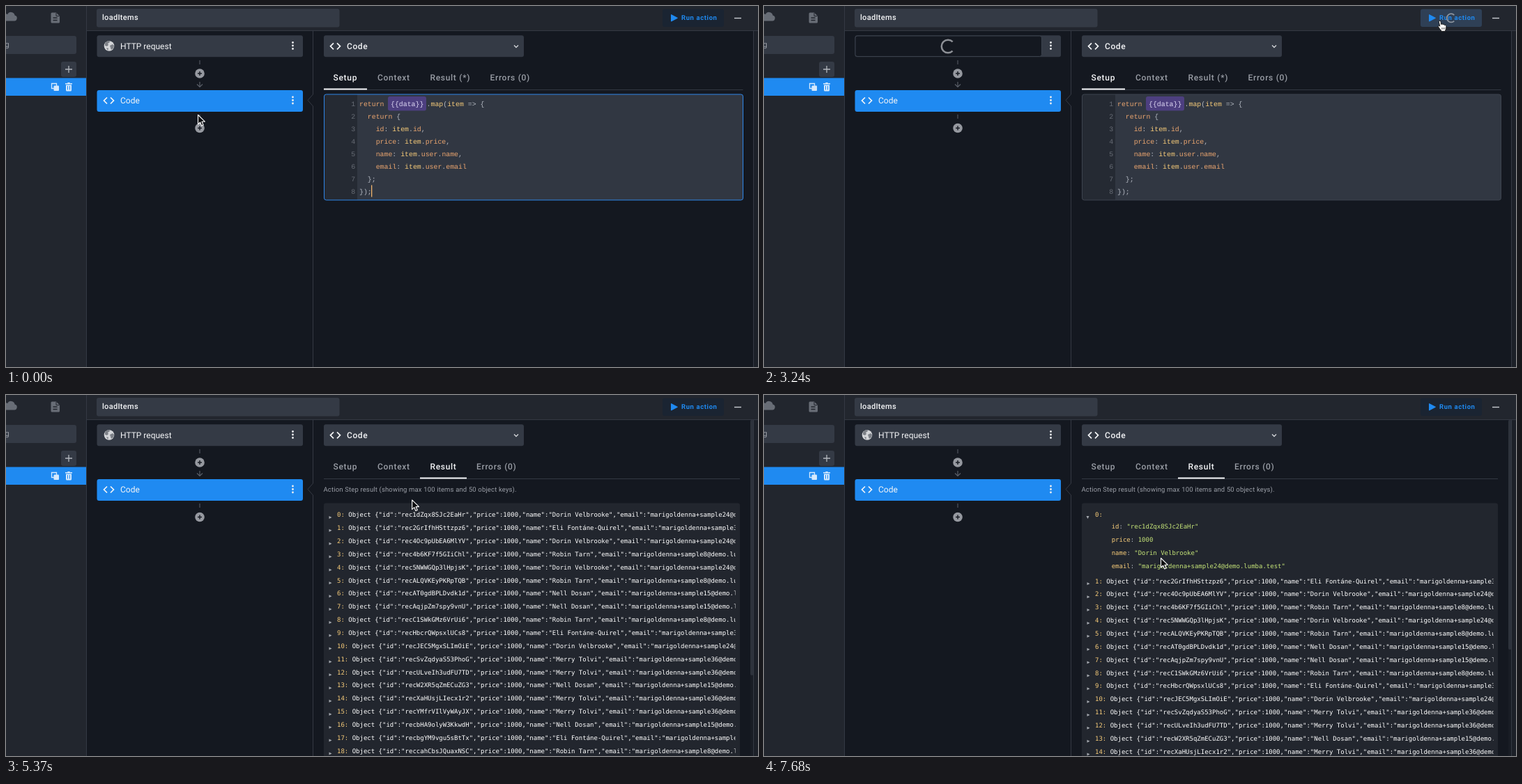
These frames come from a looping animation (1079x519 px, 7710 ms). An HTML page:

```html
<!DOCTYPE html>
<html lang="en">
<head>
<meta charset="utf-8">
<title>Action editor</title>
<style>
html, body { margin: 0; width: 100%; height: 100%; overflow: hidden; background: #141820; }
svg { display: block; width: 1079px; height: 519px; }
text { font-family: Roboto, sans-serif; white-space: pre; text-rendering: geometricPrecision; }
.code text { font: 9.87px "Liberation Mono", monospace; }
.tree text { font: 9px "DejaVu Sans Mono", monospace; }
</style>
</head>
<body>
<svg id="stage" viewBox="0 0 1079 519"></svg>
<script>
const LOOP = 7710;
const C = {
  bg: '#141820', bar: '#22262e', field: '#343a45', line: '#343943', blue: '#1f8af1',
  white: '#f4f5f7', grey: '#9a9ea6', dim: '#686d76', yellow: '#f6cb79', orange: '#eaa56f',
  green: '#c5e478', plain: '#b4b9c2'
};
const stage = document.getElementById('stage');

const attrs = o => Object.entries(o).map(([k, v]) => ` ${k}="${v}"`).join('');
const rect = (x, y, w, h, fill, rx = 0, o = {}) =>
  `<rect${attrs({ x, y, width: w, height: h, fill, rx, ...o })}/>`;
const path = (d, o) => `<path${attrs({ fill: 'none', d, ...o })}/>`;
const stroke = (d, color, w = 1) => path(d, { stroke: color, 'stroke-width': w });
const esc = s => s.replace(/&/g, '&amp;').replace(/</g, '&lt;').replace(/>/g, '&gt;');
const text = (x, y, s, size, fill, weight = 400, gap = 0, id = '') =>
  `<text x="${x}" y="${y}" font-size="${size}" fill="${fill}" font-weight="${weight}" letter-spacing="${gap}"${id && ` id="${id}"`}>${esc(s)}</text>`;
const group = (id, body, o = {}) => `<g id="${id}"${attrs(o)}>${body}</g>`;
const spans = parts => parts.map(([s, c]) => `<tspan fill="${c}">${esc(s)}</tspan>`).join('');

const dots = (x, y) => [-4.5, 0, 4.5].map(d => `<circle cx="${x}" cy="${y + d}" r="1.4" fill="#eceef1"/>`).join('');
const chevrons = (x, y) => stroke(`M${x - 2.5} ${y - 4.5}l-4.5 4.5l4.5 4.5M${x + 2.5} ${y - 4.5}l4.5 4.5l-4.5 4.5`, C.white, 1.7);
const addStep = y => `<circle cx="278" cy="${y}" r="6.8" fill="#9699a0"/>` +
  stroke(`M275 ${y}h6M278 ${y - 3}v6`, '#191d25', 1.5);

function sidebar() {
  return rect(0, 0, 115, 519, C.bar) +
    path('M-3 21.5h15a4 4 0 0 0 .6-7.9a5.5 5.5 0 0 0-10.4-1.6a4.8 4.8 0 0 0-5.2 9.5z', { fill: C.dim }) +
    path('M66 9.5h6l5 5v8.5a1.5 1.5 0 0 1-1.5 1.5h-9.5a1.5 1.5 0 0 1-1.5-1.5v-12a1.5 1.5 0 0 1 1.5-1.5z', { fill: C.dim }) +
    stroke('M67.5 17h6M67.5 20.5h6', C.bar, 1.3) + stroke('M72 10v4.5h4.5', C.bar, 1) +
    rect(-5, 43, 106, 26, C.field, 3) + text(-1.5, 59, 'g', 11, C.grey) +
    rect(79, 80, 22, 22, C.field, 3) + stroke('M85 91h10M90 86v10', '#b3b7bd', 1.3) +
    rect(0, 103.5, 115.5, 25.5, C.blue) +
    stroke('M72.5 118.5h-7v-7h7z', '#d5e9fd', 1.3) +
    rect(68.5, 114.5, 7.5, 7.5, '#d5e9fd', 1) +
    path('M86 113.5h8v7.5a1.5 1.5 0 0 1-1.5 1.5h-5a1.5 1.5 0 0 1-1.5-1.5zM85 111h3l.7-1h2.6l.7 1h3v1.5h-10z', { fill: '#d5e9fd' }) +
    stroke('M88.5 115v5.5M91.5 115v5.5', C.blue, 1) +
    rect(115, 0, 1, 519, C.line);
}

function topBar() {
  return rect(116, 0, 963, 35, C.bar) + rect(116, 35, 963, 1, C.line) +
    rect(0, 35, 115, 1, C.line) +
    rect(130, 4, 348.5, 26.5, C.field, 3) + text(138, 20.2, 'loadItems', 11, C.white, 500, .3) +
    rect(942, 4.5, 88, 25.5, '#1b2736', 3, { id: 'run' }) +
    path('M954.5 12.5v9.5l9-4.75z', { fill: C.blue, stroke: C.blue, 'stroke-linejoin': 'round' }) +
    text(969, 20.3, 'Run action', 9.5, C.blue, 700, .6) +
    group('smallSpin', stroke('M4.3 -4.3A6.1 6.1 0 1 0 4.3 4.3', '#8d949e', 1.8)) +
    stroke('M1045 17.5h10', '#c9ccd1', 1.4);
}

function flow() {
  const globe = '<circle cx="148" cy="57.5" r="7.3" fill="#d4d6d9"/>' +
    path('M142 54q2-4 6-4l1 2l-3 2l1 2l-2 2l-3-1zM149 57l4-2l2 2l-1 4l-3 2l-1-3zM144 60l3 1l-1 3z', { fill: '#7c8087' });
  return rect(130.5, 42.3, 295.5, 30.9, C.field, 3) +
    group('idle', globe + text(164, 61.6, 'HTTP request', 12, C.white)) +
    group('busy', rect(131, 43, 267.5, 29.5, C.bg, 3, { stroke: '#3b414c' }) +
      group('bigSpin', stroke('M6.6 -6.6A9.3 9.3 0 1 0 6.6 6.6', '#8d9096', 2.5))) +
    dots(411.5, 57) +
    stroke('M278 78v6', '#5a5f68') + addStep(97) +
    stroke('M278 109v7M274 112.5l4 4l4-4', '#5a5f68', 1.2) +
    rect(130.5, 121, 295.5, 31, C.blue, 3) + chevrons(147.5, 136) +
    text(164, 140.2, 'Code', 12, C.white) + dots(411.5, 135.5) +
    stroke('M278 156v6', '#5a5f68') + addStep(175.5) +
    stroke('M440.5 36v91l-7.5 8.5l7.5 8.5v375', C.line);
}

function codePane() {
  const { orange: o, yellow: y, plain: p } = C;
  const prop = (key, last, ...rest) => [['    ' + key, o], [': ', p], ['item', y],
    ...rest.flatMap(k => [['.', p], [k, o]]), [last, p]];
  const lines = [
    [['return ', o]],
    [['  ', p], ['return', o], [' {', p]],
    prop('id', ',', 'id'), prop('price', ',', 'price'),
    prop('name', ',', 'user', 'name'), prop('email', '', 'user', 'email'),
    [['  };', p]], [['});', p]]
  ];
  const line = (x, i, parts) => `<text x="${x}" y="${143.8 + i * 18}">${spans(parts)}</text>`;
  return rect(456.5, 127, 601, 152, '#313742', 3) +
    path('M504 127h-44.5a3 3 0 0 0-3 3v146a3 3 0 0 0 3 3h44.5z', { fill: '#252a33' }) +
    rect(456.5, 127, 601, 152, 'none', 3, { id: 'focus' }) +
    rect(548, 130, 55, 20.5, '#4d3f80', 3) +
    lines.map((l, i) => line(495.2, i, [[String(i + 1), C.dim]]) + line(507, i, l)).join('') +
    line(552, 0, [['{{data}}', '#dcd6f2']]) +
    line(603.6, 0, [['.', p], ['map', y], ['(', p], ['item', y], [' => {', p]]) +
    rect(524, 257.5, 1.3, 17, '#efb36c', 0, { id: 'caret' });
}

const people = {
  L: ['Dorin Velbrooke', 24], A: ['Eli Fontáne-Quirel', 33], C: ['Robin Tarn', 8],
  J: ['Nell Dosan', 15], S: ['Merry Tolvi', 36]
};
const items = ('L1dZqx8SJc2EaHr A2GrIfhHSttzpz6 L4Oc9pUbEA6MlYV C4b6KF7f5GIiChl L5NWWGQp3lHpjsK ' +
  'CALQVKEyPKRpTQB JAT0gdBPLDvdk1d JAqjpZm7spy9vnU CC1SWkGMz6VrUi6 AHbcrQWpsxlUCs8 ' +
  'LJEC5MgxSLImOiE SSvZqdyaS53PhoG SULveIh3udFU7TD JW2XR5qZmECuZG3 SXaHUsjLIecx1r2 ' +
  'SYMfrVIlVyWAyJX JbHA9olyW3KkwdH AbgYM9vgu5sBtTx CcahCbsJQuaxNSC').split(' ').map(s => {
  const [name, n] = people[s[0]];
  return { id: 'rec' + s.slice(1), price: 1000, name, email: `marigoldenna+sample${n}@demo.lumba.test` };
});

function resultPane() {
  const row = (item, i) => {
    const y = 172 + i * 18.86;
    const tri = path(`M463.5 ${y + 2}l4 2l-4 2z`, { fill: '#a4a8ae', ...(i ? {} : { id: 'tri' }) });
    const head = `<text x="475" y="${y + 3.2}">${spans([[`${i}:`, C.yellow]])}`;
    const body = spans([[' Object ' + JSON.stringify(item), '#fff']]);
    return i ? tri + head + body + '</text>'
      : tri + head + '</text>' + `<text id="closed" x="485.8" y="${y + 3.2}">${body}</text>`;
  };
  const detail = Object.entries(items[0]).map(([k, v], i) =>
    `<text x="498.7" y="${192.4 + i * 18.86}">${spans([[k, C.yellow], [': ', C.plain], [JSON.stringify(v), C.green]])}</text>`).join('');
  const rows = items.map(row);
  return text(455.5, 138.6, 'Action Step result (showing max 100 items and 50 object keys).', 9.5, C.grey, 400, .15) +
    rect(456, 155.5, 597, 380, C.bar, 3) +
    `<clipPath id="clip"><rect x="456" y="155" width="590.5" height="364"/></clipPath>` +
    `<g class="tree" clip-path="url(#clip)">${rows[0]}${group('detail', detail)}${group('rest', rows.slice(1).join(''))}</g>` +
    rect(1068, 36, 5, 483, '#191d25') + rect(1068, 36, 4.5, 367, '#2d323b', 2, { id: 'thumb' });
}

function editor() {
  const tab = (x, s, id) => text(x, 107.3, s, 12, C.grey, 500, .7, id);
  return rect(456, 42.3, 287, 30.9, C.field, 3) + chevrons(472.5, 57.8) +
    text(489, 62, 'Code', 12, C.white, 500, .6) +
    stroke('M729 56.5l3 3l3-3', '#d4d6da', 1.3) +
    tab(469.5, 'Setup', 'setupTab') + tab(533, 'Context', 'contextTab') +
    tab(608.5, 'Result (*)', 'resultTab') + tab(694.5, 'Errors (0)', 'errorTab') +
    rect(456, 120, 601.5, 1, C.line, 0, { id: 'rule' }) +
    rect(456, 118.5, 62, 2, C.white, 0, { id: 'mark' }) +
    group('setup', codePane(), { class: 'code' }) + group('result', resultPane()) +
    rect(1072, 0, 1, 519, C.line) + rect(1073, 0, 6, 519, '#1c2028');
}

const arrow = path('M0 0v13.5l3.1-2.9l2.1 4.9l2.4-1l-2.1-4.8h4.3z',
  { fill: '#0b0c0f', stroke: '#fff', 'stroke-width': 1.1, 'stroke-linejoin': 'round' });
const hand = path('M-1.2 1.2q0-1.5 1.3-1.5t1.4 1.5l.6 4q.2-1.2 1.4-1t1.3 1.4q.4-1 1.4-.7t1 1.4q.6-.7 1.4-.2t.7 1.7v2.5q0 1.7-1.1 3v1.5h-6.2v-1.3q-2-1.6-3.3-4.3q-1.4-1.8-.4-2.4t2.1.9z',
  { fill: '#fff', stroke: '#111', 'stroke-width': .9, 'stroke-linejoin': 'round' }) +
  stroke('M3.3 9.5v2.6M5.3 9.5v2.6M7.3 9.5v2.6', '#222', .7);

stage.innerHTML = rect(0, 0, 1079, 519, C.bg) + flow() + editor() + topBar() + sidebar() +
  '<circle id="ring" fill="none" stroke="#a0a3a8" stroke-width="2.6"/>' +
  group('pointer', group('arrow', arrow) + group('hand', hand));

const el = {};
stage.querySelectorAll('[id]').forEach(n => el[n.id] = n);
const show = (id, on) => el[id].setAttribute('display', on ? 'inline' : 'none');
const set = (id, o) => { for (const k in o) el[id].setAttribute(k, o[k]); };

// time, x, y of the pointer tip
const track = [
  [0, 275.5, 156.5], [750, 275.5, 156.5], [1750, 969.5, 21.5], [3800, 969.5, 21.5],
  [4290, 653, 89], [4520, 637.5, 92], [5000, 637.5, 92], [5550, 564.5, 170.5],
  [6200, 564.5, 170.5], [6850, 569.5, 234.5], [LOOP, 569.5, 234.5]
];
// x, y, press, release
const presses = [[969.5, 21, 2050, 2600], [637.5, 92, 4560, 4930], [564.5, 170.5, 5650, 5997]];
const ease = k => k * k * (3 - 2 * k);

function pointerAt(t) {
  const i = Math.max(1, track.findIndex(p => p[0] > t));
  const [a, b] = [track[i - 1], track[i]];
  const k = ease((t - a[0]) / (b[0] - a[0]));
  return [a[1] + (b[1] - a[1]) * k, a[2] + (b[2] - a[2]) * k];
}

function draw(t) {
  const [x, y] = pointerAt(t);
  const over = (l, top, r, b) => x >= l && x <= r && y >= top && y <= b;
  const done = t >= 4710, open = t >= 5890, busy = t >= 3150 && t < 3720;
  const onRun = over(942, 4, 1030, 30), onTab = over(594, 86, 680, 119);
  const pointing = onRun || onTab || over(131, 121, 426, 151) || (done && over(456, 162, 1053, 182));

  set('pointer', { transform: `translate(${x} ${y})` });
  show('hand', pointing);
  show('arrow', !pointing);

  const press = presses.find(p => t > p[2] && t < p[3]);
  show('ring', press);
  if (press) {
    const k = Math.min(1, (t - press[2]) / 100, (press[3] - t) / 100);
    set('ring', { cx: press[0], cy: press[1], r: 8 + 14.5 * k, opacity: k * k });
  }

  set('run', { fill: busy ? '#2f4056' : onRun ? '#182b42' : '#1a2432' });
  show('idle', !busy);
  show('busy', busy);
  show('smallSpin', busy);
  const turn = (t - 3240) * .36;
  set('bigSpin', { transform: `translate(264 58) rotate(${turn})` });
  set('smallSpin', { transform: `translate(986 17.3) rotate(${turn})` });

  const focused = t < 2130;
  set('focus', { stroke: focused ? '#2f86e8' : '#3d434e' });
  show('caret', focused && (t + 450) % 1000 < 500);

  show('setup', !done);
  show('result', done);
  el.resultTab.textContent = done ? 'Result' : 'Result (*)';
  set('setupTab', { fill: done ? C.grey : C.white });
  set('resultTab', { fill: done || onTab ? C.white : C.grey });
  set('errorTab', { x: done ? 675 : 694.5 });
  set('mark', { x: done ? 594 : 456, width: done ? 67 : 62 });
  set('rule', { width: done ? 597 : 601.5 });

  show('detail', open);
  show('closed', !open);
  set('rest', { transform: `translate(0 ${open ? 76.5 : 0})` });
  set('thumb', { height: open ? 330 : 367 });
  set('tri', { transform: t >= 5950 ? 'rotate(90 465 175.5)' : '' });
}

const start = performance.now();
function tick() {
  draw((performance.now() - start) % LOOP);
  requestAnimationFrame(tick);
}
draw(0);
tick();
</script>
</body>
</html>
```
